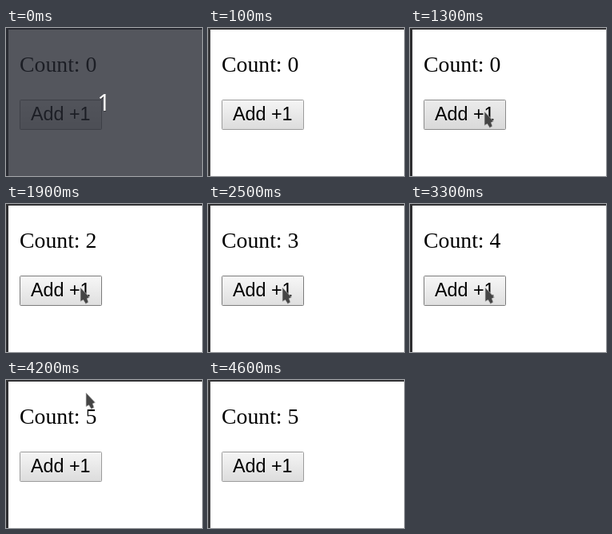
An HTML page for the animation above (4900 ms loop, 245 by 186 pixels).

```html
<!DOCTYPE html>
<html lang="en">
<head>
<meta charset="utf-8">
<title>Counter</title>
<style>
  html, body { margin: 0; width: 100%; height: 100%; overflow: hidden; background: #fff; }
  svg { display: block; }
  .serif { font: 27.75px "Liberation Serif", serif; }
  .sans { font: 23.33px "Liberation Sans", sans-serif; }
  .big { font: 500 29px "Noto Sans", sans-serif; text-anchor: middle; }
</style>
</head>
<body>
<svg width="245" height="186" viewBox="0 0 245 186">
  <defs>
    <linearGradient id="face" x2="0" y2="1">
      <stop id="top"/>
      <stop id="low" offset="1"/>
    </linearGradient>
  </defs>
  <rect width="245" height="186" fill="#fff"/>
  <rect width="245" height="2" fill="#343436"/>
  <rect id="edge" width="3" height="186"/>
  <text id="count" class="serif" x="17" y="55"></text>
  <rect id="button" x="17.5" y="90.5" width="102" height="37" rx="1" fill="url(#face)"/>
  <text class="sans" x="31" y="116">Add +1</text>
  <path id="cursor" d="M0 0V17.5L3.6 15.6L6.6 20.5L10 18.4L8.4 13.8L11.5 12.3Z"
        fill="#454545" stroke="#c8c8c8" stroke-width=".7" stroke-linejoin="round"/>
  <g id="shade">
    <rect width="245" height="186" fill="#242730" opacity=".78"/>
    <text class="big" x="123" y="105" fill="#222" opacity=".6">1</text>
    <text class="big" x="122.5" y="104" fill="#fff">1</text>
  </g>
</svg>
<script>
const LOOP = 4900;
const $ = id => document.getElementById(id);
const presses = [[1200, 1400], [1700, 1900], [2300, 2500], [3000, 3300], [3500, 3700]];
// time, x, y of the pointer tip
const path = [
  [500, 88, 165], [600, 91, 138], [700, 93, 116], [800, 93, 105],
  [2900, 94, 105], [4100, 96, 78], [4200, 100, 16], [4300]
];
// top, bottom and border of the button
const looks = {
  idle: ["#f5f5f5", "#dcdcdc", "#9c9c9c"],
  hover: ["#f7f7f7", "#dfdfdf", "#7c7c7c"],
  down: ["#ebebeb", "#d9d9d9", "#8c8c8c"]
};
const show = (el, on) => el.setAttribute("visibility", on ? "visible" : "hidden");

function draw(t) {
  show($("shade"), t < 100);
  $("count").textContent = "Count: " + presses.filter(p => t >= p[1]).length;

  const down = presses.some(([a, b]) => t >= a && t < b);
  const hover = t >= 700 && t < 4100;
  const [top, low, line] = looks[down ? "down" : hover ? "hover" : "idle"];
  $("top").setAttribute("stop-color", top);
  $("low").setAttribute("stop-color", low);
  $("button").setAttribute("stroke", line);
  $("edge").setAttribute("fill", t >= 1200 && t < 4600 ? "#2f2f31" : "#3b3b3d");

  const [, x, y] = path.filter(p => t >= p[0]).pop() || [];
  show($("cursor"), x !== undefined);
  if (x !== undefined) $("cursor").setAttribute("transform", `translate(${x} ${y})`);
}

const start = performance.now();
function tick() {
  draw((performance.now() - start) % LOOP);
  requestAnimationFrame(tick);
}
tick();
</script>
</body>
</html>
```
